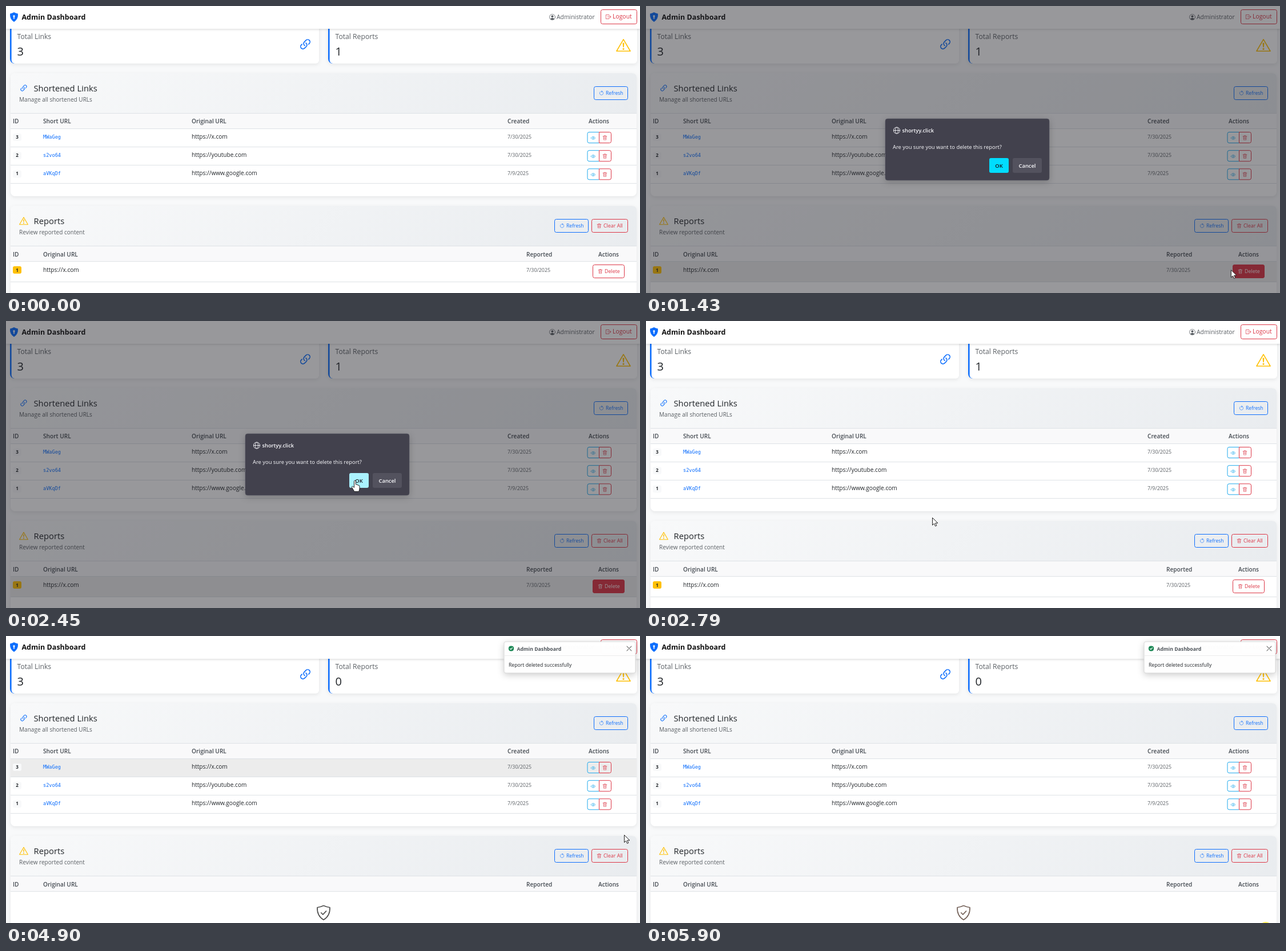
Recreate the animation shown at these times as an HTML page. Size 1110x504 px, loop 5970 ms.

```html
<!DOCTYPE html>
<html lang="en">
<head>
<meta charset="utf-8">
<title>Admin Dashboard</title>
<style>
html, body { margin: 0; width: 100%; height: 100%; overflow: hidden; background: #f8f9fa; }
svg { display: block; width: 100%; height: 100%; }
text { font-family: "Open Sans", "Noto Sans", sans-serif; white-space: pre; }
.semi { font-weight: 600; }
.bold { font-weight: 700; }
.mid { text-anchor: middle; }
.mono { font-family: "DejaVu Sans Mono", monospace; }
.card { filter: drop-shadow(0 2px 3px rgba(0, 0, 0, .08)); }
.bar { filter: drop-shadow(0 1px 2px rgba(0, 0, 0, .16)); }
.float { filter: drop-shadow(0 3px 6px rgba(0, 0, 0, .2)); }
.icon { fill: none; stroke: currentColor; stroke-linecap: round; stroke-linejoin: round; }
.solid { fill: currentColor; stroke: none; }
</style>
</head>
<body>
<svg id="stage" viewBox="0 0 1110 504">
  <defs>
    <linearGradient id="sheen" gradientUnits="userSpaceOnUse" x1="264.5" y1="-138.5" x2="847.5" y2="444.5">
      <stop stop-color="#f8f9fa"/><stop offset="1" stop-color="#e9ecef"/>
    </linearGradient>
    <symbol id="link" viewBox="0 0 16 16"><path class="solid" d="M4.715 6.542 3.343 7.914a3 3 0 1 0 4.243 4.243l1.828-1.829A3 3 0 0 0 8.586 5.5L8 6.086a1 1 0 0 0-.154.199 2 2 0 0 1 .861 3.337L6.88 11.45a2 2 0 1 1-2.83-2.83l.793-.792a4 4 0 0 1-.128-1.287zM6.586 4.672A3 3 0 0 0 7.414 9.5l.775-.776a2 2 0 0 1-.896-3.346L9.12 3.55a2 2 0 1 1 2.83 2.83l-.793.792c.112.42.155.855.128 1.287l1.372-1.372a3 3 0 1 0-4.243-4.243z"/></symbol>
    <symbol id="warn" viewBox="0 0 16 16"><path d="M8 1.6 15.4 14.3H.6z"/><path class="solid" d="M7.1 5.4h1.8l-.4 4.8h-1z"/><circle class="solid" cx="8" cy="12" r=".95"/></symbol>
    <symbol id="refresh" viewBox="0 0 16 16"><path d="M4.6 3.1A6 6 0 1 0 11 2.8M8 .4v4.8l3-2.4z"/></symbol>
    <symbol id="trash" viewBox="0 0 16 16"><path d="M2 3.500h12M6 3.500v-2h4v2M3.500 3.500l.8 11.500h7.400l.8-11.500M6.200 6.500v5.500M9.800 6.500v5.500"/></symbol>
    <symbol id="eye" viewBox="0 0 16 16"><path d="M.8 8Q8-1.500 15.200 8 8 17.500.8 8z"/><circle cx="8" cy="8" r="2.400"/></symbol>
    <symbol id="exit" viewBox="0 0 16 16"><path d="M10 4.500v-2H1.500v11H10v-2M6 8h9M12 5l3 3-3 3"/></symbol>
    <symbol id="person" viewBox="0 0 16 16"><circle cx="8" cy="8" r="7.300"/><circle class="solid" cx="8" cy="6" r="2.900"/><path class="solid" d="M2.700 13Q8 6.500 13.300 13 8 17 2.700 13z"/></symbol>
    <symbol id="lock" viewBox="0 0 16 16"><path class="solid" d="M8 0Q11 1.800 14.500 2.300 15.500 11 8 16 .5 11 1.500 2.300 5 1.800 8 0z"/><path fill="#fff" stroke="none" d="M8 5a1.500 1.500 0 0 1 .6 2.900l.4 2.600H7l.4-2.600A1.500 1.500 0 0 1 8 5z"/></symbol>
    <symbol id="shield" viewBox="0 0 16 16"><path d="M8 .6Q11 2 14.500 2.500 15 11 8 15.400 1 11 1.500 2.500 5 2 8 .6zM5.500 8l1.800 1.800 3.400-3.500"/></symbol>
    <symbol id="done" viewBox="0 0 16 16"><circle class="solid" cx="8" cy="8" r="8"/><path stroke="#fff" stroke-width="2" d="M4.500 8.300l2.500 2.400 4.500-5"/></symbol>
    <symbol id="globe" viewBox="0 0 16 16"><circle cx="8" cy="8" r="7.200"/><ellipse cx="8" cy="8" rx="3.300" ry="7.200"/><path d="M1 8h14"/></symbol>
    <symbol id="cross" viewBox="0 0 16 16"><path d="M1 1l14 14M15 1L1 15"/></symbol>
  </defs>
</svg>
<script>
const BLUE = '#0d6efd', RED = '#dc3545', CYAN = '#1fa9ec', AMBER = '#ffc107';
const HEAD = '#454b52', MUTED = '#5a5f64', INK = '#212529', LINE = '#dee2e6';

const text = (x, y, size, str, fill = INK, cls = '') =>
  `<text x="${x}" y="${y}" font-size="${size}" fill="${fill}" class="${cls}">${str}</text>`;
const rect = (x, y, w, h, fill, extra = '') =>
  `<rect x="${x}" y="${y}" width="${w}" height="${h}" fill="${fill}" ${extra}/>`;
const icon = (name, cx, cy, size, color, weight = 1.1) =>
  `<use href="#${name}" class="icon" x="${cx - size / 2}" y="${cy - size / 2}" width="${size}" height="${size}" color="${color}" stroke-width="${weight}"/>`;
const rule = y => rect(8, y, 1096, 1, LINE);
const group = (id, body) => `<g id="${id}">${body}</g>`;

function button(x, y, w, h, color, name, label, size, fill = 'none', ink = color) {
  const cy = y + h / 2;
  return rect(x + .5, y + .5, w - 1, h - 1, fill, `rx="3" stroke="${color}"`) +
    icon(name, x + 13.5, cy, size, ink) + text(x + 21, cy + 3.4, size, label, ink);
}

function statCard(x, w, label, id, values) {
  return `<g class="card">${rect(x, 20, 30, 81, BLUE, 'rx="8"')}${rect(x + 2.6, 20, w - 2.6, 81, '#fff', 'rx="6"')}</g>` +
    text(x + 12.5, 58, 12.2, label, MUTED) +
    values.map((v, i) => `<g id="${id}${i}">${text(x + 12.5, 87, 20, v)}</g>`).join('');
}

function sectionHead(title, subtitle, name, color) {
  return '<path fill="url(#sheen)" d="M8 188V126q0-8 8-8h1080q8 0 8 8v62z"/>' +
    icon(name, 31, 144.500, 16, color) + text(48.5, 150, 14.8, title) +
    text(23, 167.500, 10.05, subtitle, MUTED) + rect(8, 188, 1096, 27, '#f9f9fa') + rule(188) + rule(215);
}

const th = (x, y, label) => text(x, y, 10.15, label, HEAD, 'semi');

function linkRow([id, code, url, date], i) {
  const y = 216 + i * 32.2, cy = y + 15;
  return rect(8, y, 1096, 31.2, '#ececec', `id="link${i}"`) + rule(Math.round(y + 31)) +
    rect(12, cy - 7, 15, 13, '#f8f9fa', 'rx="3"') + text(19.5, cy + 2, 8, id, INK, 'bold mid') +
    text(65, cy + 2, 8.6, code, BLUE, 'mono') + text(325, cy + 2, 10.1, url) +
    text(878, cy + 2, 8.9, date, MUTED) +
    `<path fill="none" stroke="${CYAN}" d="M1038 ${cy - 9.500}h-17q-3 0-3 3v13q0 3 3 3h17"/>` +
    `<path fill="none" stroke="${RED}" d="M1038.500 ${cy - 9.500}h18q3 0 3 3v13q0 3-3 3h-18z"/>` +
    icon('eye', 1028, cy + .8, 9, CYAN) + icon('trash', 1048.500, cy + .3, 9, RED);
}

const links = [
  ['3', 'MWaGeg', 'https://x.com', '7/30/2025'],
  ['2', 's2vo64', 'https://youtube.com', '7/30/2025'],
  ['1', 'aVKqDf', 'https://www.google.com', '7/9/2025']
];

const page = rect(0, 0, 1110, 504, '#f8f9fa') +
  statCard(7, 541, 'Total Links', 'links', ['3']) + icon('link', 524, 68, 26, BLUE) +
  statCard(564, 541, 'Total Reports', 'reports', ['0', '1']) + icon('warn', 1081, 69, 26, AMBER, 1) +
  rect(8, 118, 1096, 216, '#fff', 'rx="8" class="card"') +
  sectionHead('Shortened Links', 'Manage all shortened URLs', 'link', BLUE) +
  button(1029, 141, 60, 24, BLUE, 'refresh', 'Refresh', 8.6) +
  th(12, 205.500, 'ID') + th(65, 205.500, 'Short URL') + th(325, 205.500, 'Original URL') +
  th(878, 205.500, 'Created') + th(1020, 205.500, 'Actions') +
  links.map(linkRow).join('') +
  rect(8, 351, 1096, 170, '#fff', 'rx="8" class="card"') +
  `<g transform="translate(0 233)">${sectionHead('Reports', 'Review reported content', 'warn', AMBER)}</g>` +
  button(960, 374, 60, 24, BLUE, 'refresh', 'Refresh', 8.6) +
  button(1025, 374, 64, 24, RED, 'trash', 'Clear All', 8.9) +
  th(12, 439.500, 'ID') + th(65, 439.500, 'Original URL') + th(911, 439.500, 'Reported') + th(1037, 439.500, 'Actions') +
  group('report',
    rect(8, 449, 1096, 35, '#ececec', 'id="reportHover"') + rule(484) +
    rect(12, 457, 15, 13, AMBER, 'rx="3"') + text(19.5, 466.500, 8, '1', INK, 'bold mid') +
    text(65, 466.800, 10.1, 'https://x.com') + text(911, 466.800, 8.9, '7/30/2025', MUTED) +
    button(1027, 454, 56, 24, RED, 'trash', 'Delete', 8.9) +
    group('deleteFill', button(1027, 454, 56, 24, RED, 'trash', 'Delete', 8.9, RED, '#fff'))) +
  group('empty', rect(8, 449, 1096, 55, '#ececec', 'id="emptyHover"') +
    `<g id="emptyIcon">${icon('shield', 556, 486, 27, 'inherit', 1)}</g>`) +
  rect(0, 0, 1110, 40, '#fff', 'class="bar"') + icon('lock', 14, 19.500, 17, BLUE) +
  text(27.5, 24, 12.5, 'Admin Dashboard', '#111', 'bold') +
  icon('person', 956.500, 19.500, 11, MUTED) + text(964, 23.300, 10.4, 'Administrator', MUTED) +
  button(1041, 6, 64, 26, RED, 'exit', 'Logout', 10.4);

const toast = group('toast',
  rect(872, 10, 230, 55, '#fff', 'fill-opacity=".98" rx="3" stroke="#d8d8d8" class="float"') +
  rect(872, 34, 230, 1, '#ececec') + icon('done', 884.500, 22, 9.6, '#198754') +
  text(894.5, 25.500, 8.7, 'Admin Dashboard', '#4d5359', 'bold') + icon('cross', 1091, 22, 9.5, '#666', 1.7) +
  text(880, 53.500, 8.7, 'Report deleted successfully'));

const dialog = group('dialog',
  rect(0, 0, 1110, 504, '#1c1b22', 'opacity=".45"') +
  rect(419, 198, 287, 108, '#42414d', 'rx="4" stroke="#53525e" stroke-width=".6" class="float"') +
  icon('globe', 439, 218.500, 12.5, '#fbfbfe') + text(448.5, 222, 9.3, 'shortyy.click', '#fbfbfe', 'semi') +
  text(432, 251, 9.4, 'Are you sure you want to delete this report?', '#fbfbfe') +
  rect(601, 267, 34, 26, '#0df', 'id="ok" rx="3"') + text(618, 284, 9.4, 'OK', '#15141a', 'semi mid') +
  rect(642, 267, 51, 26, '#53525e', 'rx="3"') + text(667.5, 284, 9.4, 'Cancel', '#fbfbfe', 'semi mid'));

const pointer = '<circle id="halo" r="11" fill="#ffec1c" opacity=".75"/>' +
  group('cursor',
    '<path id="arrow" fill="#fff" stroke="#222" d="M.5.5v13l3-2.800 2.100 4.600 2.200-1-2.100-4.400h4.300z"/>' +
    '<path id="hand" fill="#fff" stroke="#222" stroke-linejoin="round" d="M-1.500 11V1.500a1.400 1.400 0 0 1 2.800 0V7q2.400-.8 2.400.8 2.200-.6 2.300 1 2-.3 2 1.500v4q0 2.500-1.500 5.200H-1L-5 13q-1.300-2.200.2-2.800 1.200-.2 3.300 2.300z"/>');

document.getElementById('stage').insertAdjacentHTML('beforeend', page + toast + dialog + pointer);

const el = id => document.getElementById(id);
const show = (id, on) => el(id).setAttribute('visibility', on ? 'inherit' : 'hidden');
const fade = (id, v) => el(id).setAttribute('opacity', v);
const ramp = (t, from, length) => Math.min(1, Math.max(0, (t - from) / length));

const LOOP = 5970, STEP = 70;
const CLICK = 1230, OPEN = 1300, CLOSE = 2520, REMOVED = 2930;
const anchors = [0, 330, 890, 1550, 1620, 2310, 2790, 2930, 3820, 4630, 4900, 5230, 5900];
// Pointer route: time, x, y
const route = [
  [330, 985, 489], [890, 1033, 460], [1230, 1039, 462], [1370, 1039, 462],
  [1550, 768, 484], [2110, 611, 280], [2520, 611, 280], [2790, 501, 345], [2860, 450, 374],
  [3230, 266, 443], [3819, 266, 443], [3820, 278, 418], [4370, 596, 77], [4629, 596, 77],
  [4630, 606, 66], [4700, 690, 110], [4830, 925, 232], [4900, 1082, 349], [5230, 1098, 494],
  [5370, 1095, 480], [5510, 1090, 503]
];

// The screen refreshes in steps counted from the latest anchor.
function tick(t) {
  const start = anchors.filter(a => a <= t).pop();
  return start + Math.floor((t - start) / STEP) * STEP;
}

function pointerAt(t) {
  if (t < 330 || t >= 4970 && t < 5230 || t >= 5510) return null;
  const i = route.findIndex(p => p[0] > t);
  const [t0, x0, y0] = route[i - 1], [t1, x1, y1] = route[i];
  const k = (t - t0) / (t1 - t0);
  return { x: x0 + (x1 - x0) * k, y: y0 + (y1 - y0) * k };
}

function render(now) {
  const t = tick(now % LOOP);
  const at = pointerAt(t);
  const before = pointerAt(t - STEP);
  const open = t >= OPEN && t < CLOSE;
  const removed = t >= REMOVED;
  const over = (top, bottom) => before && !open && before.y >= top && before.y < bottom;

  links.forEach((_, i) => show('link' + i, over(216 + i * 32.2, 247 + i * 32.2)));
  show('reportHover', open || over(449, 484));
  show('emptyHover', t >= 5230 && t < 5510);
  show('report', !removed);
  show('empty', removed);
  if (!(t >= 5230 && t < 5510)) show('emptyHover', false);
  el('emptyIcon').setAttribute('color', t < 5230 ? '#50504f' : '#76645b');
  show('reports0', removed);
  show('reports1', !removed);
  fade('deleteFill', ramp(t, 890, 150) - ramp(t, CLOSE, 150));
  show('toast', t >= 3000);
  fade('toast', ramp(t, 2930, 150));
  show('dialog', open);
  el('ok').setAttribute('fill', t < 2110 ? '#00ddff' : t < 2310 ? '#80ebff' : '#aaf2ff');

  const hand = t >= 890 && t < 1370 || t >= 2110 && t < CLOSE;
  show('cursor', at);
  show('arrow', at && !hand);
  show('hand', at && hand);
  if (at) el('cursor').setAttribute('transform', `translate(${at.x} ${at.y})`);

  const last = t >= 5900;
  show('halo', t >= CLICK && t < 1370 || t >= 2310 && t < 2450 || last);
  const spot = last ? { x: 1085, y: 511 } : at;
  if (spot) {
    el('halo').setAttribute('cx', spot.x);
    el('halo').setAttribute('cy', spot.y + 2);
  }
}

function frame() {
  render(performance.now());
  requestAnimationFrame(frame);
}
frame();
</script>
</body>
</html>
```
